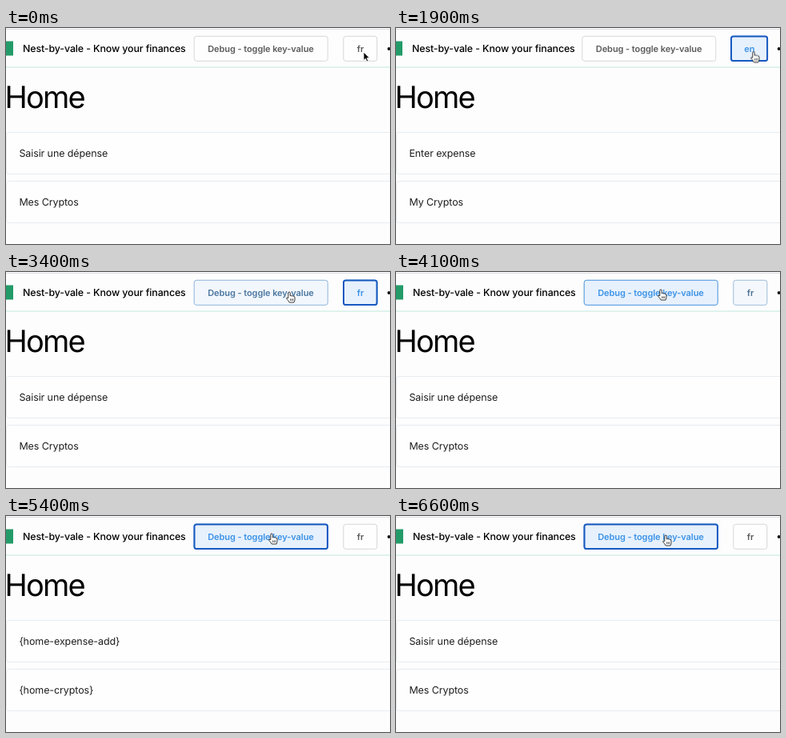
An HTML page that plays this animation: 480 by 270 pixels, repeating every 6.8 s.

```html
<!DOCTYPE html>
<html lang="en">
<head>
<meta charset="utf-8">
<title>Language toggle</title>
<style>
html, body { margin: 0; width: 100%; height: 100%; overflow: hidden; background: #fdfdfe; }
svg { display: block; width: 100%; height: 100%; font-family: Inter, Roboto, sans-serif; text-rendering: geometricPrecision; }

.title { font-size: 12.4px; font-weight: 450; letter-spacing: -.11px; fill: #000; }
.heading { font-size: 38px; font-weight: 430; letter-spacing: -1.7px; fill: #000; }
.card { fill: #fefeff; stroke: #e7ecef; }
.labels { font-size: 12.5px; letter-spacing: -.1px; fill: #1e1e1e; }
.button { font-size: 11px; font-weight: 600; letter-spacing: -.07px; text-anchor: middle; fill: #5b5b5b; }
.button rect { fill: #fefefe; stroke: #d5d7d9; }
.hot { fill: #3b92e6; }
.hot rect { fill: #e7f1fd; stroke: #4a97e2; }
.button .ring { fill: none; stroke: #1658c0; stroke-width: 2; }

/* one loop is 6800 ms: 1% = 68 ms */
.brand, .debug, .french, .english, .keys, .lang-fr, .lang-en,
.lang-ring, .debug-ring, .cursor, .arrow, .hand { animation: 6.8s step-end infinite; }
.brand { animation-name: brand; }
.debug { animation-name: debug; }
.french { animation-name: french; }
.english, .lang-en { animation-name: english; }
.keys { animation-name: keys; }
.lang-fr { animation-name: lang-fr; }
.lang-ring { animation-name: lang-ring; }
.debug-ring { animation-name: debug-ring; }
.cursor { animation-name: travel; }
.arrow { animation-name: arrow; }
.hand { animation-name: hand; }
.lang-hot { animation: lang-hot 6.8s linear infinite; }
.debug-hot { animation: debug-hot 6.8s linear infinite; }

@keyframes brand {
  0%, 33.824%, 100% { transform: translateX(0); }
  13.235% { transform: translateX(-1px); }
}
@keyframes debug {
  0%, 33.824%, 100% { transform: translateX(0); }
  13.235% { transform: translateX(-2.4px); }
}
@keyframes french {
  0%, 33.824%, 86.765%, 100% { visibility: visible; }
  13.235%, 61.765% { visibility: hidden; }
}
@keyframes english {
  0%, 33.824%, 100% { visibility: hidden; }
  13.235% { visibility: visible; }
}
@keyframes keys {
  0%, 86.765%, 100% { visibility: hidden; }
  61.765% { visibility: visible; }
}
@keyframes lang-fr {
  0%, 33.824%, 100% { visibility: visible; }
  13.235% { visibility: hidden; }
}
@keyframes lang-ring {
  0%, 58.824%, 100% { opacity: 0; }
  13.235% { opacity: 1; }
}
@keyframes debug-ring {
  0%, 100% { opacity: 0; }
  61.765% { opacity: 1; }
}
@keyframes lang-hot {
  0%, 7.352% { opacity: 0; }
  7.353% { opacity: .25; animation-timing-function: steps(3); }
  11.765%, 58.823% { opacity: 1; }
  58.824% { opacity: .6; animation-timing-function: steps(3); }
  63.235%, 100% { opacity: 0; }
}
@keyframes debug-hot {
  0%, 48.528% { opacity: 0; }
  48.529% { opacity: .25; animation-timing-function: steps(3); }
  52.941%, 100% { opacity: 1; }
}
@keyframes travel {
  0% { transform: translate(447px, 30px); }
  27.941% { transform: translate(447px, 29.5px); }
  44.118% { transform: translate(443.5px, 35.5px); }
  45.588% { transform: translate(432px, 36px); }
  47.059% { transform: translate(411px, 34px); }
  48.529% { transform: translate(380px, 30px); }
  50% { transform: translate(354px, 25px); }
  51.471% { transform: translate(338px, 22px); }
  52.941% { transform: translate(332px, 22px); }
  54.412% { transform: translate(331px, 22px); }
  73.529% { transform: translate(332px, 22px); }
  89.706% { transform: translate(334px, 22.5px); }
  94.118% { transform: translate(335.5px, 23.5px); }
  97.059%, 100% { transform: translate(337px, 24px); }
}
@keyframes arrow {
  0%, 47.059% { visibility: visible; }
  7.353%, 48.529%, 100% { visibility: hidden; }
}
@keyframes hand {
  0%, 47.059% { visibility: hidden; }
  7.353%, 48.529%, 100% { visibility: visible; }
}
</style>
</head>
<body>
<svg viewBox="0 0 480 270">
  <rect width="480" height="270" fill="#fdfdfe"/>
  <path d="M0 1.5H480" stroke="#dedce1"/>
  <path d="M0 49H480" stroke="#c0e8da"/>

  <g class="brand">
    <rect x="-9" y="16.5" width="18" height="18" fill="#239b69"/>
    <text class="title" x="21" y="30.4">Nest-by-vale - Know your finances</text>
  </g>

  <g class="button debug">
    <rect x="235.2" y="10.3" width="167" height="31" rx="3"/>
    <text x="318.5" y="29.9">Debug - toggle key-value</text>
    <g class="hot debug-hot">
      <rect x="235.2" y="10.3" width="167" height="31" rx="3"/>
      <text x="318.5" y="29.9">Debug - toggle key-value</text>
    </g>
    <rect class="ring debug-ring" x="235.5" y="10.5" width="166.4" height="30.6" rx="2.5"/>
  </g>

  <g class="button lang-fr">
    <rect x="421.8" y="10.3" width="42" height="31" rx="3"/>
    <text x="443" y="29.9">fr</text>
    <g class="hot lang-hot">
      <rect x="421.8" y="10.3" width="42" height="31" rx="3"/>
      <text x="443" y="29.9">fr</text>
    </g>
    <rect class="ring lang-ring" x="422" y="10.5" width="41.6" height="30.6" rx="2.5"/>
  </g>

  <g class="button lang-en">
    <g class="hot">
      <rect x="418.8" y="10.3" width="45.5" height="31" rx="3"/>
      <text x="441.8" y="29.9">en</text>
    </g>
    <rect class="ring" x="419" y="10.5" width="45.1" height="30.6" rx="2.5"/>
  </g>

  <circle cx="478.7" cy="26" r="2" fill="#111"/>

  <text class="heading" x="-1.6" y="100">Home</text>
  <rect class="card" x=".5" y="130.5" width="490" height="52" rx="3"/>
  <rect class="card" x=".5" y="191.5" width="490" height="52" rx="3"/>

  <g class="labels">
    <g class="french">
      <text x="16.4" y="161">Saisir une dépense</text>
      <text x="16.4" y="222">Mes Cryptos</text>
    </g>
    <g class="english">
      <text x="16.4" y="161">Enter expense</text>
      <text x="16.4" y="222">My Cryptos</text>
    </g>
    <g class="keys">
      <text x="16.4" y="161">{home-expense-add}</text>
      <text x="16.4" y="222">{home-cryptos}</text>
    </g>
  </g>

  <g class="cursor" stroke-linejoin="round">
    <path class="arrow" d="M0 0V10.5L2.4 8.3 4 12 5.8 11.2 4.2 7.6H7.4Z" stroke="#fff" stroke-width=".9"/>
    <g class="hand" fill="#fff" stroke="#222" stroke-width=".9">
      <path d="M-1.2 1.2Q-1.2 0 0 0T1.2 1.2V4.8Q2.2 4 3.2 5Q4.4 4.3 5.3 5.4Q7 5.2 7 7V9.5Q7 11 6 13H.2Q-1.2 10.5-3.4 8.2Q-3.8 6.6-1.2 7.6Z"/>
      <path d="M1.6 8.4v2.6M3.2 8.4v2.6M4.8 8.4v2.6" stroke-width=".7"/>
    </g>
  </g>
</svg>
</body>
</html>
```
